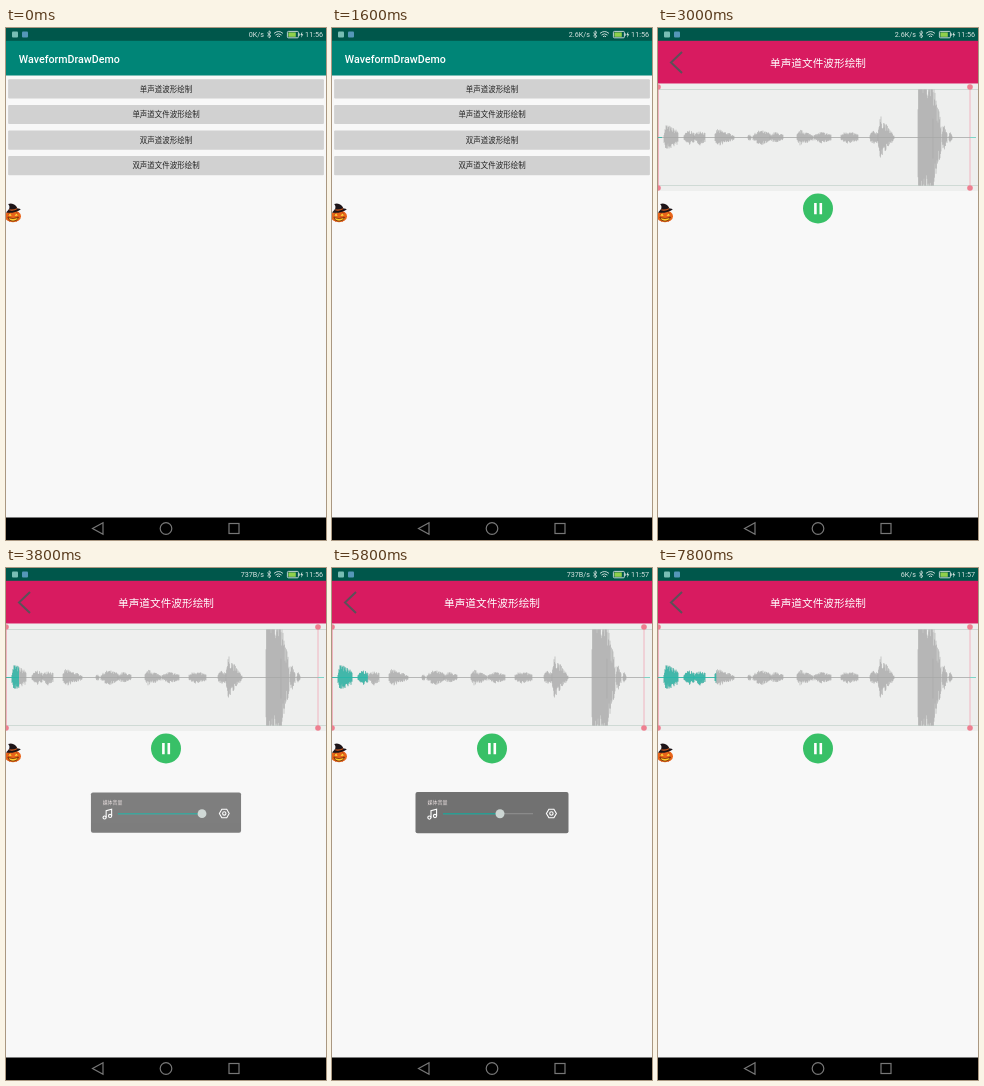
Write an HTML page that moves like this. It is 320x512 px and loops after 8 s.

```html
<!DOCTYPE html>
<html lang="zh-CN">
<head>
<meta charset="utf-8">
<style>
html, body { margin: 0; width: 100%; height: 100%; overflow: hidden; background: #f8f8f8; }
svg { display: block; width: 320px; height: 512px; }
text { font-family: Roboto, "Noto Sans CJK SC", "Noto Sans CJK", sans-serif; }
</style>
</head>
<body>
<svg viewBox="0 0 320 512">
  <defs>
    <clipPath id="playedClip"><rect id="played" y="56" width="0" height="108"/></clipPath>
  </defs>
  <rect width="320" height="512" fill="#f8f8f8"/>

  <g id="home">
    <rect y="12" width="320" height="35.5" fill="#008577"/>
    <text x="12.8" y="34.6" font-size="10.67" font-weight="500" fill="#fff">WaveformDrawDemo</text>
    <g id="buttons" font-size="7.47" font-weight="500" text-anchor="middle" fill="#222"></g>
  </g>
  <rect id="dim" y="12" width="320" height="478" opacity="0"/>

  <g id="page">
    <rect y="12" width="320" height="478" fill="#f8f8f8"/>
    <rect y="12" width="320" height="43.7" fill="#d81b60"/>
    <path d="M24 24 13 34.5 24 45" fill="none" stroke="#5c5058" stroke-width="2"/>
    <text x="160" y="39" font-size="10.67" text-anchor="middle" fill="#fff">单声道文件波形绘制</text>
    <rect y="55.7" width="320" height="107.3" fill="#eeefee"/>
    <path d="M0 61.5H320M0 157.5H320" stroke="#cfdad5"/>
    <path id="idleLine" d="M0 109.5H320" stroke="#8fd6c8"/>
    <g id="wave">
      <path d="M0.5 59V160M312 59V160" stroke="#f0b4c0"/>
      <path d="M0 109.5H312" stroke="#a9a9a9" stroke-width=".8"/>
      <path d="M312 109.5H318" stroke="#7fd3c5"/>
      <path id="grayBars" stroke="#aaa" stroke-width=".6"/>
      <g clip-path="url(#playedClip)" stroke="#28b9a8">
        <path d="M0 109.5H312" stroke-width=".8"/>
        <path id="tealBars" stroke-width=".6"/>
      </g>
      <g fill="#ee7f90">
        <circle cx="0" cy="59" r="2.8"/><circle cx="312" cy="59" r="2.8"/>
        <circle cx="0" cy="160" r="2.8"/><circle cx="312" cy="160" r="2.8"/>
      </g>
    </g>
    <circle cx="160" cy="180.5" r="15" fill="#38c067"/>
    <path id="playIcon" d="M155 173.5 167.5 180.5 155 187.5Z" fill="#fff"/>
    <path id="pauseIcon" d="M157.4 175V186.3M162.8 175V186.3" stroke="#fff" stroke-width="2.6"/>
  </g>

  <g id="volume">
    <rect x="83.5" y="224" width="153" height="41.2" rx="2" fill="#717171"/>
    <text x="95.5" y="236.3" font-size="5" fill="#e6dcdc">媒体音量</text>
    <g fill="none" stroke="#fff" stroke-width="1.1">
      <circle cx="97.4" cy="249.6" r="1.6"/><circle cx="103" cy="248" r="1.6"/>
      <path d="M99 249.6V242.6L104.6 241.2V248"/>
      <path d="M214.4 245.5 216.9 241.2H221.9L224.4 245.5 221.9 249.8H216.9Z"/>
      <circle cx="219.4" cy="245.5" r="1.7"/>
    </g>
    <path d="M111 245.7H201" stroke="#8a8a8a" stroke-width="1.2"/>
    <path id="level" stroke="#2a9c92" stroke-width="1.6"/>
    <circle id="knob" cy="245.7" r="4.5" fill="#ccd6d3"/>
  </g>

  <g id="pumpkin">
    <ellipse cx="7" cy="188.3" rx="8" ry="6" fill="#e8641a"/>
    <path d="M3.5 183.5Q1 188 3.5 193.5M10.5 183.5Q13 188 10.5 193.5" fill="none" stroke="#b5400f" stroke-width=".8"/>
    <path d="M2 187.6 4.2 185.6 5.6 188ZM8.6 188 10.4 185.6 12.3 187.4Z" fill="#ffd83a"/>
    <path d="M1.8 189.6Q7 191.6 12.6 189.4 11 193.2 7 193.2 3.2 193.2 1.8 189.6Z" fill="#ffc928" stroke="#5b1d08" stroke-width=".7"/>
    <path d="M0 184.6Q2.5 182.2 3.4 180.2 4 177.8 2.2 176 6 174.6 9 177 11 178.8 11.4 180.6 13.6 180.4 14.8 181.4 8 185.8 0 184.6Z" fill="#1d1418"/>
    <path d="M3.3 181.8Q7.5 182.8 11.2 180.6" fill="none" stroke="#d55a1d" stroke-width="1.1"/>
  </g>

  <rect width="320" height="12.8" fill="#00574b"/>
  <rect x="6" y="3.5" width="6" height="6" rx="1" fill="#78bdb4"/>
  <rect x="16" y="3.5" width="6" height="6" rx="1" fill="#5597b8"/>
  <g font-size="7.2" fill="#d5e3e0" text-anchor="end">
    <text id="speed" x="258" y="9.2"></text>
    <text id="clock" x="317" y="9.2"></text>
  </g>
  <path d="M261.2 4.6 265 8.2 263.1 10V2.8L265 4.6 261.2 8.2" fill="none" stroke="#d5e3e0" stroke-width=".8"/>
  <g fill="none" stroke="#d5e3e0" stroke-width=".9">
    <path d="M268 5.4Q272.5 1.6 277 5.4M269.5 7.1Q272.5 4.5 275.5 7.1M271 8.7Q272.5 7.4 274 8.7"/>
    <rect x="281.4" y="3.4" width="11" height="6.4" rx="1"/>
  </g>
  <rect x="282.4" y="4.4" width="7.4" height="4.4" fill="#8fd04c"/>
  <path d="M293.2 5.4V7.8" stroke="#d5e3e0"/>
  <path d="M296.3 3.6 294.4 7H295.6L295 9.8 297.3 6.2H296Z" fill="#d5e3e0"/>

  <rect y="489.5" width="320" height="22.5"/>
  <g fill="none" stroke="#777" stroke-width="1.2">
    <path d="M86.5 500.5 97 494.7V506.3Z"/>
    <circle cx="160" cy="500.5" r="5.8"/>
    <rect x="223" y="495.5" width="10" height="10"/>
  </g>
</svg>
<script>
const LOOP = 8000, STEP = 200, MID = 109.5;
const $ = id => document.getElementById(id);
const set = (id, attrs) => { for (const k in attrs) $(id).setAttribute(k, attrs[k]); };
const show = (id, on) => set(id, { visibility: on ? "visible" : "hidden" });
const clamp = (v, lo, hi) => Math.min(hi, Math.max(lo, v));
const ramp = (t, a, b) => clamp((t - a) / (b - a), 0, 1);

$("buttons").innerHTML = ["单声道波形绘制", "单声道文件波形绘制", "双声道波形绘制", "双声道文件波形绘制"]
  .map((label, i) => {
    const y = 51.3 + i * 25.6;
    return `<rect x="2.1" y="${y}" width="315.8" height="19.2" rx="1" fill="#d1d1d1"/>
      <text x="160" y="${y + 12.3}">${label}</text>`;
  }).join("");

// Sound bursts: start, peak, end, height, height share at the end
const bursts = [
  [6, 8, 20, 14, .5], [26, 31, 36, 8, .6], [36, 42, 47, 8, .6], [57, 59, 76, 9, .3],
  [90, 91, 93, 4, .5], [95, 102, 112, 8, .6], [112, 117, 125, 6, .5],
  [139, 142, 155, 8, .4], [156, 163, 173, 6, .6], [183, 188, 200, 7, .5],
  [212, 214, 220, 7, .8], [220, 222.5, 236, 22, .1],
  [260, 261, 275, 100, .7], [275, 275.5, 283, 55, .3], [284, 285, 289, 17, .4], [291, 292, 294, 7, .5]
];

function wavePath() {
  let seed = 7, d = "";
  const rand = () => (seed = seed * 16807 % 2147483647) / 2147483647;
  for (const [start, peak, end, height, tail] of bursts) {
    for (let x = start; x <= end; x += .5) {
      const env = x < peak ? .4 + .6 * (x - start) / (peak - start)
        : 1 - (1 - tail) * (x - peak) / (end - peak);
      const side = () => Math.min(48, height * env * (.45 + .55 * rand())).toFixed(1);
      d += `M${x} ${MID - side()}V${MID + +side()}`;
    }
  }
  return d;
}
const bars = wavePath();
set("grayBars", { d: bars });
set("tealBars", { d: bars });

function draw(time) {
  const t = Math.floor(time / STEP) * STEP;

  const slide = 320 * Math.pow(1 - ramp(t, 2000, 2400), 5.15);
  const cover = 1 - slide / 320;
  set("home", { transform: `translate(${-138 * cover} 0)` });
  set("dim", { opacity: .43 * cover });
  set("page", { transform: `translate(${slide} 0)` });

  const playing = t >= 2600;
  show("idleLine", !playing);
  show("wave", playing);
  show("playIcon", !playing);
  show("pauseIcon", playing);
  set("played", { width: clamp(13 + .0113 * (t - 3800), 0, 312) });

  const shown = ramp(t, 3500, 3870) * (1 - ramp(t, 7200, 7600));
  const size = .9 + .1 * shown;
  const level = 196.7 - 28.7 * ramp(t, 3800, 4600);
  set("volume", {
    opacity: Math.sqrt(shown),
    transform: `translate(160 244.6) scale(${size}) translate(-160 -244.6)`
  });
  set("level", { d: `M111 245.7H${level}` });
  set("knob", { cx: level });

  $("speed").textContent = t < 600 ? "0K/s" : t < 3400 ? "2.6K/s" : t < 6200 ? "737B/s" : "6K/s";
  $("clock").textContent = t < 4400 ? "11:56" : "11:57";
}

const began = performance.now();
function tick() {
  draw((performance.now() - began) % LOOP);
  requestAnimationFrame(tick);
}
tick();
</script>
</body>
</html>
```
